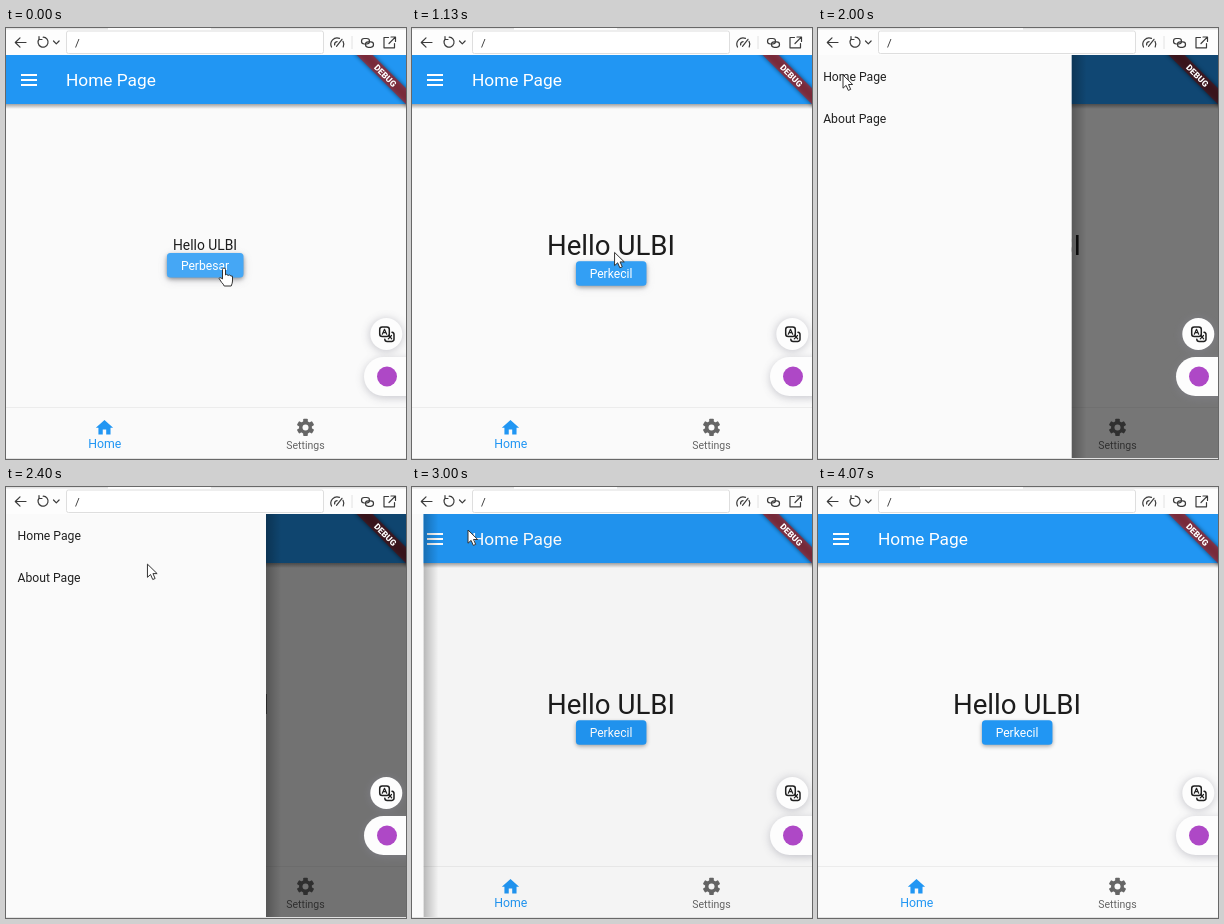
Recreate the animation shown at these times as an HTML page. Size 400 by 431 pixels, loop 4.4 s.

```html
<!DOCTYPE html>
<html lang="id">
<head>
<meta charset="utf-8">
<title>Home Page</title>
<style>
  html, body { margin: 0; width: 100%; height: 100%; overflow: hidden; background: #fafafa; }
  svg { display: block; width: 100vw; height: 100vh; }
  text { font-family: Roboto, "Open Sans", sans-serif; }
  .mid { text-anchor: middle; }
  .line { fill: none; stroke: #3a3a3a; stroke-width: 1.2; stroke-linecap: round; stroke-linejoin: round; }
  .bold { stroke: #1f1f1f; stroke-width: 1.5; }
</style>
</head>
<body>
<svg viewBox="0 0 400 431" preserveAspectRatio="none">
  <defs>
    <filter id="soft" x="-50%" y="-50%" width="200%" height="200%"><feGaussianBlur stdDeviation="2"/></filter>
    <filter id="wide" x="-50%" y="-50%" width="200%" height="200%"><feGaussianBlur stdDeviation="4"/></filter>
    <linearGradient id="drop" x2="0" y2="1">
      <stop stop-opacity=".35"/><stop offset="1" stop-opacity="0"/>
    </linearGradient>
    <linearGradient id="edge">
      <stop stop-opacity=".25"/><stop offset="1" stop-opacity="0"/>
    </linearGradient>
    <clipPath id="appClip"><rect y="27" width="400" height="403"/></clipPath>
  </defs>

  <rect width="400" height="431" fill="#fafafa"/>

  <g clip-path="url(#appClip)">
    <rect y="76" width="400" height="5" fill="url(#drop)"/>
    <rect y="27" width="400" height="49" fill="#2196f3"/>
    <circle id="menuHover" cx="23" cy="52" r="24"/>
    <path d="M15 47h16M15 52h16M15 57h16" stroke="#fff" stroke-width="1.8"/>
    <text x="60" y="58" font-size="17.3" fill="#fff">Home Page</text>

    <text id="hello" class="mid" x="199" fill="#1c1c1c">Hello ULBI</text>
    <g id="button">
      <rect id="glow" class="box" y="3" height="24" rx="4" fill="#8a8a98" filter="url(#wide)"/>
      <rect class="box" y="2" height="24" rx="4" opacity=".35" filter="url(#soft)"/>
      <rect class="box" height="24.5" rx="3.5" fill="#2196f3"/>
      <rect id="shine" class="box" height="24.5" rx="3.5" fill="#fff"/>
      <text id="label" class="mid" x="199" y="16.5" font-size="12.1" fill="#fff"></text>
    </g>

    <path d="M0 379.5h400" stroke="#ececec"/>
    <path transform="translate(88.1 389.3) scale(.865)" fill="#2196f3" d="M10 20v-6h4v6h5v-8h3L12 3 2 12h3v8z"/>
    <text class="mid" x="98.7" y="420" font-size="12.3" fill="#2196f3">Home</text>
    <g id="gear" transform="translate(299.5 399.4)" fill="#666"></g>
    <text class="mid" x="299.4" y="421" font-size="10.5" fill="#666">Settings</text>

    <g transform="translate(400 27) rotate(45)">
      <rect x="-50" y="23.5" width="100" height="11.4" opacity=".55" filter="url(#soft)"/>
      <rect x="-50" y="23.5" width="100" height="11.4" fill="#b71c1c" opacity=".63"/>
    </g>

    <rect id="scrim" y="27" width="400" height="404"/>
    <g id="drawer">
      <rect x="260" y="27" width="15" height="404" fill="url(#edge)"/>
      <rect y="27" width="260" height="404" fill="#fafafa"/>
      <g font-size="12.2" fill="#212121">
        <text x="11.5" y="53">Home Page</text>
        <text x="11.5" y="94.5">About Page</text>
      </g>
    </g>

    <g transform="translate(400 27) rotate(45)">
      <text class="mid" y="32.3" font-size="8.6" font-weight="900" fill="#fff">DEBUG</text>
    </g>
  </g>

  <g id="floating">
    <g fill="#8a8a98" opacity=".45" filter="url(#wide)">
      <circle cx="380" cy="307" r="16.5"/><rect x="358" y="331" width="60" height="39" rx="19.5"/>
    </g>
    <circle cx="380.3" cy="306" r="16" fill="#fdfdfd"/>
    <rect x="358" y="329" width="60" height="39" rx="19.5" fill="#fdfdfd"/>
    <circle cx="381" cy="348.5" r="10" fill="#ae48c6"/>
    <g class="line bold">
      <rect x="373.7" y="299" width="9.6" height="9.6" rx="2.5"/>
      <path d="M376.3 306.2l2.2-4.9 2.2 4.9M377.2 304.7h2.6" stroke-width="1.2"/>
      <path d="M386 304.3a2.3 2.3 0 0 1 2 2.3v4.6a2.3 2.3 0 0 1-2.3 2.3h-4.6a2.3 2.3 0 0 1-2.3-2.2"/>
      <path d="M382.3 310.9l3.2-3.4m-2.6 0l2.8 3.4" stroke-width="1.2"/>
    </g>
  </g>

  <g id="toolbar">
    <rect width="400" height="27" fill="#fdfdfd"/>
    <path d="M0 .8h102M205 .8h195" stroke="#e2e2e2" stroke-width="1.4"/>
    <rect x="60.5" y="3" width="257" height="22.5" rx="2" fill="#fff" stroke="#dedede"/>
    <text x="69" y="19" font-size="11.5" fill="#333">/</text>
    <path d="M346 8v13" stroke="#e2e2e2"/>
    <g class="line">
      <path d="M20 14.5H9.5m4.5-4.7l-4.7 4.7 4.7 4.7"/>
      <path d="M33.2 11a5 5 0 1 0 4-1.8M33 8.5v3h3M47.5 13l2.8 2.8 2.8-2.8"/>
      <path d="M325.5 19a6.3 6.3 0 0 1 8-8.6M337 13.3a6.3 6.3 0 0 1 .2 5.7M330.5 18.3l5.5-7M328.6 17a3 3 0 0 1 2.5-3.3"/>
      <rect x="355.5" y="10.5" width="8" height="5.5" rx="2.7"/>
      <rect x="359.5" y="13.8" width="8" height="5.5" rx="2.7"/>
      <path d="M382.5 9.5H378v10.3h10.5v-4.3M385 9h4.5v4.5M389.3 9.2l-6.3 6.3"/>
    </g>
  </g>
  <path d="M0 430.5h400" stroke="#e2e2e2"/>

  <g id="tooltip">
    <rect x="7" y="72" width="117" height="21.3" rx="3.5" fill="#616161" opacity=".92"/>
    <text class="mid" x="65.2" y="86.5" font-size="10.5" fill="#fff">Open navigation menu</text>
  </g>

  <g id="cursor" fill="#fff" stroke="#333" stroke-linejoin="round">
    <path id="arrow" d="M0 0v13.2l3.1-2.8 2.2 5 2.4-1-2.2-4.9h4.2z"/>
    <path id="hand" d="M-1.5 11V1.5a1.5 1.5 0 0 1 3 0V7l1-.6 1.7 1 1.3-.4 1.5 1 1.5.2V13q0 2-1.3 5h-7q-.8-2-2.5-3.5l-2.6-4q.5-1.8 3.4.5z"/>
  </g>
</svg>
<script>
const LOOP = 4400, STEP = 200 / 3, LAST_STEP = 61;
const GROW_AT = 400, OPEN_AT = 1750, CLOSE_AT = 2870;
const $ = id => document.getElementById(id);
const set = (el, attrs) => { for (const key in attrs) el.setAttribute(key, attrs[key]); };
const clamp = v => Math.min(1, Math.max(0, v));
const ramp = (t, from, to) => clamp((t - from) / (to - from));
const smooth = v => v * v * (3 - 2 * v);

// Remaining distance of a critically damped spring
const spring = (ms, rate) => {
  const x = Math.max(0, ms) / 1000 * rate;
  return (1 + x) * Math.exp(-x);
};

// Cursor tip: [time, x, y]
const route = [
  [0, 218, 240], [1050, 218, 240], [1530, 25, 45], [1800, 25, 45], [2000, 25, 47],
  [2170, 25, 47], [2700, 315, 122], [2870, 315, 122], [3000, 56, 43],
  [3250, 56, 43], [3720, -20, 62], [LOOP, -20, 62]
];

function cursorAt(t) {
  const i = route.findIndex(p => p[0] > t);
  const [a, b] = [route[i - 1], route[i]];
  const k = smooth(ramp(t, a[0], b[0]));
  return [1, 2].map(n => a[n] + (b[n] - a[n]) * k);
}

function buildGear() {
  const teeth = [0, 60, 120].map(a =>
    `<rect x="-2.3" y="-8.7" width="4.6" height="17.4" rx=".8" transform="rotate(${a})"/>`);
  $('gear').innerHTML = teeth.join('') + '<circle r="6.4"/><circle r="3" fill="#fafafa"/>';
}

function draw(t) {
  const big = t >= GROW_AT;
  set($('hello'), { 'font-size': big ? 27.68 : 13.84, y: big ? 226.5 : 221.7 });
  $('label').textContent = big ? 'Perkecil' : 'Perbesar';
  set($('button'), { transform: `translate(0 ${big ? 233.2 : 225})` });
  const width = big ? 70.5 : 76.5;
  document.querySelectorAll('.box').forEach(el => set(el, { x: 199.2 - width / 2, width }));

  const hover = 1 - ramp(t, 1070, 1200);
  const press = ramp(t, GROW_AT - 70, GROW_AT + 130) * (1 - ramp(t, 700, 950));
  set($('shine'), { opacity: hover * (0.16 + 0.1 * press) });
  set($('glow'), { opacity: hover * (0.4 + 0.2 * press) });

  let open = t < CLOSE_AT ? 1 - spring(t - OPEN_AT, 22.4) : spring(t - CLOSE_AT, 37.7);
  if (open < 0.003) open = 0;
  set($('drawer'), {
    transform: `translate(${260 * (open - 1)} 0)`,
    visibility: open ? 'visible' : 'hidden'
  });
  set($('scrim'), { opacity: 0.54 * open });

  set($('menuHover'), { opacity: 0.05 * ramp(t, 1450, 1600) * (1 - ramp(t, 1900, 2000)) });
  set($('tooltip'), { opacity: ramp(t, 1520, 1660) * (1 - ramp(t, 1750, 1870)) });

  const [x, y] = cursorAt(t);
  const overButton = Math.abs(x - 199) < 36 && y > 232;
  const overMenu = Math.hypot(x - 23, y - 52) < 24 && open < 0.1;
  const pointing = overButton || overMenu;
  set($('cursor'), { transform: `translate(${x} ${y})` });
  set($('hand'), { visibility: pointing ? 'visible' : 'hidden' });
  set($('arrow'), { visibility: pointing ? 'hidden' : 'visible' });
}

// The picture advances at 15 steps per second and rests on the last one
function stepTime(ms) {
  const shown = Math.floor(ms / 10) * 10 + 5;
  return Math.min(LAST_STEP, Math.floor(shown / STEP)) * STEP;
}

buildGear();
const start = performance.now();
function tick() {
  draw(stepTime((performance.now() - start) % LOOP));
  requestAnimationFrame(tick);
}
tick();
</script>
</body>
</html>
```
